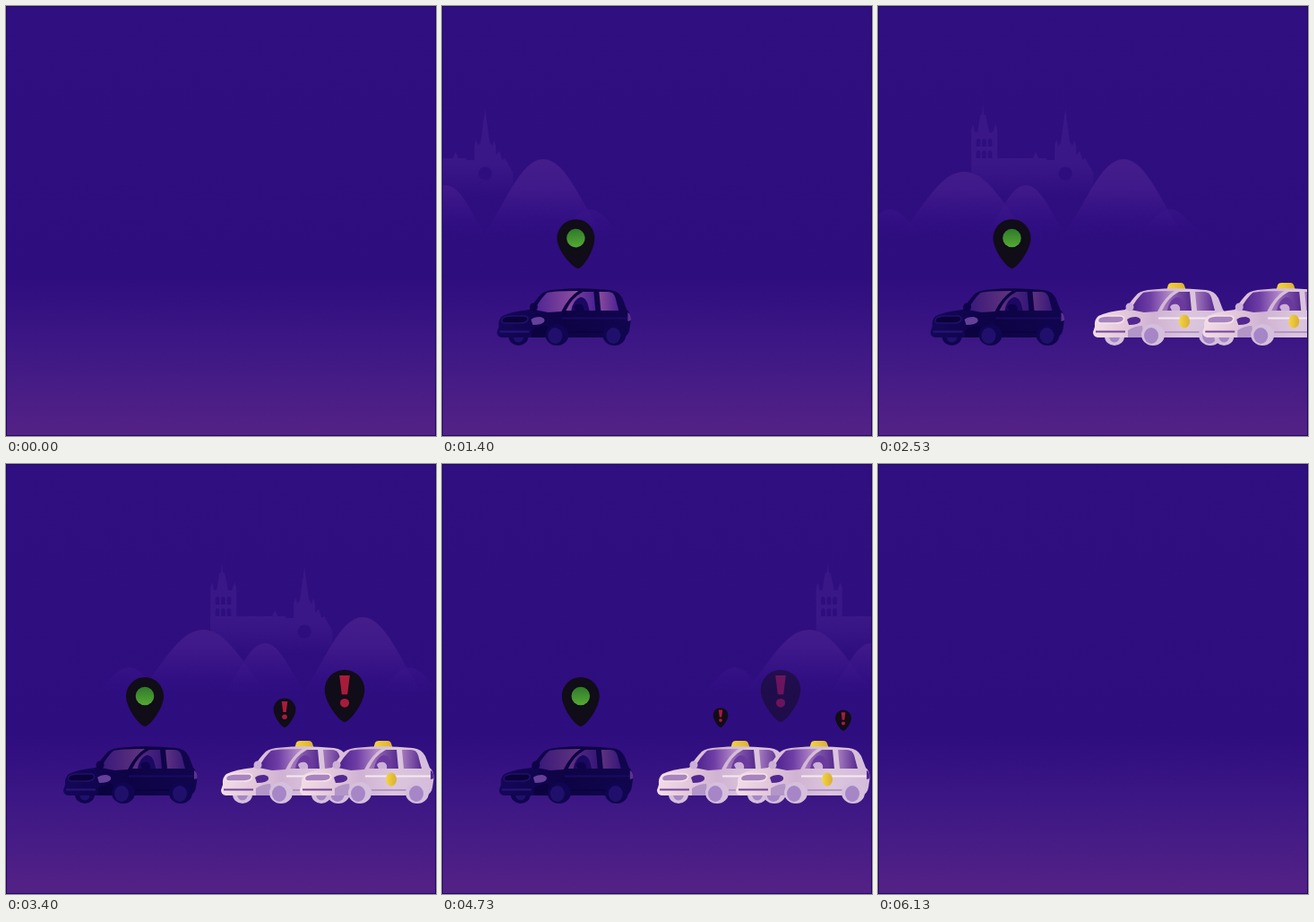
These frames come from a looping animation (480x480 px, 6270 ms). An HTML page:

```html
<!DOCTYPE html>
<html lang="en">
<head>
<meta charset="utf-8">
<title>Night taxis</title>
<style>
  html, body { margin: 0; width: 100%; height: 100%; overflow: hidden; background: #2f0e80; }
  svg { display: block; width: 100vw; height: 100vh; }
</style>
</head>
<body>
<svg id="stage" viewBox="0 0 480 480"></svg>
<script>
const LOOP = 6270;
const stage = document.getElementById('stage');

// Linear gradient; stops are "offset colour [opacity]"
const gradient = (id, coords, ...stops) => {
  const [x1, y1, x2, y2, units = 'objectBoundingBox'] = coords;
  const list = stops.map(s => {
    const [at, color, alpha = 1] = s.split(' ');
    return `<stop offset="${at}" stop-color="${color}" stop-opacity="${alpha}"/>`;
  });
  return `<linearGradient id="${id}" gradientUnits="${units}" x1="${x1}" y1="${y1}" x2="${x2}" y2="${y2}">${list.join('')}</linearGradient>`;
};
const shape = (d, fill, extra = '') => `<path d="${d}" fill="${fill}" ${extra}/>`;
const oval = (x, y, rx, ry, fill) => `<ellipse cx="${x}" cy="${y}" rx="${rx}" ry="${ry}" fill="${fill}"/>`;

const hill = (x, top, w) => {
  const h = 256 - top;
  return shape(`M${x - w} 256C${x - w * .62} ${top + h * .6} ${x - w * .38} ${top} ${x} ${top}
    S${x + w * .62} ${top + h * .6} ${x + w} 256Z`, 'url(#hill)');
};

const skyline = () => {
  const church = `M228 215V138L230 132L232 141H235L238 122L240 121L241 110L242 121L244 122L248 141H252
    L255 132L257 138V170H297L300 163L303 170H312V172H321V156L323 149L325 156L328 152L333 115
    L338 152L341 156L343 150L345 157V166L349 162L352 172L355 170L364 186V215Z`;
  let panes = '';
  for (const y of [148, 161])
    for (const x of [233.5, 240, 246.5])
      panes += shape(`M${x} ${y + 9}v-7q2.3 -4 4.6 0v7z`, '#2e0e7e');
  return shape(church, 'url(#church)') + panes + oval(333, 187, 7.5, 7.5, '#2e0e7e') +
    hill(137, 227, 36) + hill(450, 227, 36) + hill(220, 185, 74) + hill(289, 200, 46) + hill(398, 171, 68);
};

// Car with its left edge at 0, facing left
const car = (id, c, taxi) => `<g id="${id}">
  ${taxi ? shape('M82 318L84 311Q85 309 88 309H98Q101 309 102 312L104 318Z', 'url(#lamp)') : ''}
  ${oval(24, 369, 11, 10, c.tyre)}${oval(24, 369, 6, 6.5, c.hub)}
  ${shape(`M2 358Q1 350 6 346Q16 341 36 339Q43 328 50 321Q55 317 67 316.5Q93 314 126 317
    Q136 318 140 326L145 339Q150 343 149.5 351L148 361Q147 367 142 370H5Q0 369 0 364Z`, c.body)}
  <g class="glass">
    ${shape('M42 339Q49 326 56 320Q63 318 91 318Q80 325 72 341L57 342Z', c.glass)}
    ${shape('M77 340Q83 326 96 319H108L110 340Z', c.side)}
    ${shape('M114 319H124Q130 319 132 325L136 340H116Z', c.side)}
  </g>
  ${shape('M83 340Q85 328 93 325Q101 325 103 340Z', c.seat)}
  ${oval(41, 336, 4.5, 4.5, c.mirror)}
  ${shape('M86 336Q88 332 94 333Q98 335 97 340H88Z', c.mirror)}
  ${shape('M39 370V362Q47 357 55 357L57 370Z', c.shade)}
  ${shape('M6 349Q9 346 16 346H31Q36 347 34 351Q32 354 25 354H8Q4 353 6 349Z', c.grill, `stroke="${c.rim}" stroke-width="1.6"`)}
  ${shape('M3 363.5H36', 'none', `stroke="${c.line}" stroke-width="2"`)}
  ${shape('M38 350Q41 347 48 347Q54 348 53 352Q51 356 40 356Z', c.light)}
  ${shape('M73 348.5H146', 'none', `stroke="${c.trim}" stroke-width="1.8"`)}
  ${shape('M80 364H119', 'none', `stroke="${c.shade}" stroke-width="2"`)}
  ${shape('M146 342Q150 344 149.5 351L146 352Z', c.tail)}
  ${oval(67, 367, 13, 12, c.tyre)}${oval(65, 368, 8, 9, c.hub)}
  ${oval(131, 367, 13, 12, c.tyre)}${oval(130, 368, 8, 9, c.hub)}
  ${taxi ? oval(102, 352, 6, 7.5, 'url(#lamp)') : ''}
</g>`;

const white = {
  body: 'url(#white)', glass: 'url(#glass)', side: 'url(#side)', seat: '#6b3a9f', mirror: '#cdb0d6',
  grill: '#a883bd', rim: '#f5e3ec', line: '#73479d', light: '#522791', trim: '#f6e9f2',
  shade: '#b395c8', tail: '#522791', tyre: '#d5bfdd', hub: '#a686c6'
};
const dark = {
  body: 'url(#dark)', glass: 'url(#nightGlass)', side: 'url(#nightSide)', seat: '#1b0862', mirror: '#0e0348',
  grill: '#0a0238', rim: '#20106a', line: '#291474', light: '#654098', trim: '#1a0a60',
  shade: '#0b0240', tail: '#5d3292', tyre: '#100550', hub: '#20106c'
};

// Map pin with its tip at the origin
const pin = (id, mark) => `<g id="${id}">
  ${shape('M0 0C-5 0 -21 -20 -21 -34A21 21 0 0 1 21 -34C21 -20 5 0 0 0Z', '#100c18')}${mark}</g>`;
const alert = shape('M-5.5 -49H5.5L3 -29H-3Z', '#a81c3a') + oval(0, -20, 4.8, 4.6, '#a81c3a');

stage.innerHTML = `<defs>
  ${gradient('sky', [0, 0, 0, 1], '0 #300f81', '.63 #2e0d7f', '.8 #3e1885', '1 #542286')}
  ${gradient('church', [0, 110, 0, 212, 'userSpaceOnUse'], '0 #3a1787', '.65 #3a1787', '1 #3a1787 0')}
  ${gradient('hill', [0, 171, 0, 256, 'userSpaceOnUse'], '0 #451d8b', '.4 #3f198a', '1 #35128a 0')}
  ${gradient('white', [0, 0, 1, 0], '0 #f4dde6', '.25 #e2c7da', '.45 #d0b2d3', '.7 #dcc6dc', '1 #d4bbdb')}
  ${gradient('dark', [0, 0, 1, 0], '0 #14075a', '.5 #0d0344', '1 #11064e')}
  ${gradient('glass', [0, 0, 1, 0], '0 #4a1f8c', '.45 #6f3ea5', '1 #c49bd0')}
  ${gradient('side', [0, 0, 1, 0], '0 #a67bbf', '1 #56298f')}
  ${gradient('nightGlass', [0, 0, 1, 0], '0 #4d2393', '1 #92509f')}
  ${gradient('nightSide', [0, 0, 1, 0], '0 #8a4b9e', '1 #4b2192')}
  ${gradient('lamp', [0, 0, 1, 0], '0 #f3d63f', '1 #d9ae36')}
  ${gradient('go', [0, 0, 0, 1], '0 #2f7a2b', '1 #55a934')}
</defs>
<rect width="480" height="480" fill="url(#sky)"/>
<g id="town">${skyline()}</g>
${car('back', white, true)}${car('front', white, true)}${car('own', dark, false)}
${pin('ownPin', oval(0, -34, 10.3, 10.3, 'url(#go)'))}
${pin('pinA', alert)}${pin('pinB', alert)}${pin('pinC', alert)}
<rect x=".5" y=".5" width="479" height="479" fill="none" stroke="#210964"/>`;

const el = id => document.getElementById(id);
const glass = document.querySelector('#own .glass');
const part = (t, start, length) => Math.min(1, Math.max(0, (t - start) / length));
const easeOut = p => 1 - (1 - p) ** 2;
const easeInOut = p => p < .5 ? 2 * p * p : 1 - 2 * (1 - p) ** 2;
const move = (id, x, y = 0, rest = '') => el(id).setAttribute('transform', `translate(${x} ${y})${rest}`);

// Drive in from the right, wait, then leave to the left
const drive = (t, stop, inAt, inTime, outAt) =>
  482 + (stop - 482) * easeOut(part(t, inAt, inTime)) - (stop + 153) * easeInOut(part(t, outAt, 660));

const popPin = (t, id, x, y, size, inAt, outAt) => {
  const grow = easeOut(part(t, inAt, 350)) * (1 - part(t, outAt, 210));
  move(id, x, y, ` scale(${size * grow})`);
};

function draw(t) {
  move('town', .1425 * (t - 3400));

  const settle = 6 * easeInOut(part(t, 2350, 900)) * (1 - part(t, 4720, 660));
  const own = drive(t, 58, 180, 1340, 4720) + settle;
  const swing = -5 * part(t, 700, 600) * (1 - easeInOut(part(t, 1450, 500)));
  move('own', own);
  move('ownPin', own + 91, 293, ` rotate(${swing})`);
  glass.setAttribute('opacity', 1 - .35 * part(t, 1400, 700));

  move('back', drive(t, 240, 1500, 1000, 5470));
  move('front', drive(t, 328, 1950, 1100, 5095));

  popPin(t, 'pinA', 311, 294, .7, 3190, 4640);
  popPin(t, 'pinC', 448, 298, .72, 3500, 4645);
  move('pinB', 378, 288, ` scale(${1.06 * easeOut(part(t, 2750, 350))})`);
  el('pinB').setAttribute('opacity', 1 - part(t, 4650, 160));
}

function tick() {
  draw(performance.now() % LOOP);
  requestAnimationFrame(tick);
}
tick();
</script>
</body>
</html>
```
